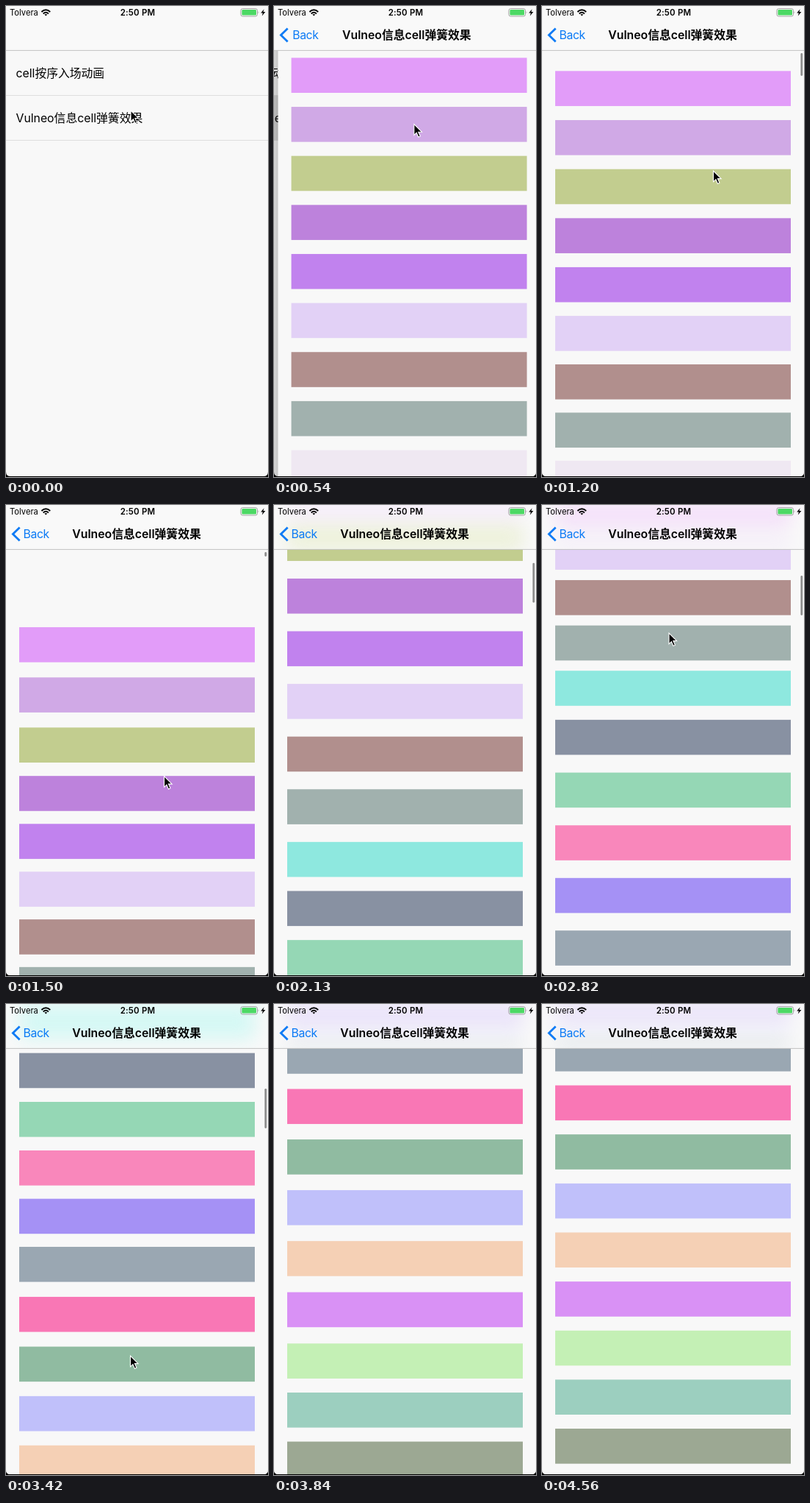
Recreate the animation shown at these times as an HTML page. Size 357 by 640 pixels, loop 4.62 s.

```html
<!DOCTYPE html>
<html lang="zh-CN">
<head>
<meta charset="utf-8">
<style>
html, body { margin: 0; width: 100%; height: 100%; overflow: hidden; background: #000; }
svg { display: block; width: 100vw; height: 100vh; }
text { font-family: Inter, "Noto Sans CJK SC", "Noto Sans CJK", sans-serif; font-size: 15.8px; }
</style>
</head>
<body>
<svg viewBox="0 0 357 640">
  <defs>
    <clipPath id="screen"><path d="M0 0H357V633Q357 639 351 639H6Q0 639 0 633Z"/></clipPath>
    <clipPath id="navClip"><rect width="357" height="60.5"/></clipPath>
    <filter id="frost" filterUnits="userSpaceOnUse" x="-40" y="-80" width="440" height="200" color-interpolation-filters="sRGB">
      <feGaussianBlur stdDeviation="13"/>
      <feColorMatrix type="saturate" values="1.8"/>
    </filter>
    <linearGradient id="shade"><stop offset="0" stop-opacity="0"/><stop offset="1" stop-opacity=".12"/></linearGradient>
  </defs>
  <rect width="357" height="640"/>
  <g clip-path="url(#screen)">
    <rect width="357" height="640" fill="#f8f8f8"/>
    <g id="list">
      <rect id="pressed" y="122" width="357" height="61" fill="#d9d9d9"/>
      <path d="M0 121.5H357M0 182.5H357" stroke="#dedede"/>
      <text x="13.5" y="96.5">cell按序入场动画</text>
      <text x="13.5" y="158">Vulneo信息cell弹簧效果</text>
    </g>
    <rect id="dim" width="357" height="640" opacity="0"/>
    <g id="page">
      <rect x="-9" width="9" height="640" fill="url(#shade)"/>
      <rect width="357" height="640" fill="#f8f8f8"/>
      <g id="bars"></g>
      <rect id="thumb" x="352.4" width="2.8" rx="1.4" fill="#8c8c8c"/>
    </g>
    <rect width="357" height="60.5" fill="#f9f9f9"/>
    <g clip-path="url(#navClip)" opacity=".22">
      <g filter="url(#frost)"><g clip-path="url(#navClip)"><use href="#bars"/></g></g>
    </g>
    <path d="M0 60.4H357" stroke="#bcbcbc" stroke-width=".9"/>
    <g id="back" fill="#0a7af5">
      <path d="M18.6 30.6L9.4 39.6L18.6 48.6" fill="none" stroke="#0a7af5" stroke-width="2.8"/>
      <text id="backText" x="23.5" y="45.4" letter-spacing="-.4">Back</text>
    </g>
    <text id="title" x="178" y="45.4" text-anchor="middle" font-weight="600">Vulneo信息cell弹簧效果</text>
    <text x="5" y="13" style="font-size:11.2px">Tolvera</text>
    <text x="179.5" y="13" text-anchor="middle" font-weight="600" style="font-size:11.4px" letter-spacing=".25">2:50 PM</text>
    <g fill="none" stroke="#000" stroke-width="2">
      <path d="M48.4 8.1Q54.3 2.5 60.2 8.1M50.7 10.4Q54.3 7.2 57.9 10.4"/>
      <path d="M54.3 13.6L52.4 11.6Q54.3 10.2 56.2 11.6Z" fill="#000" stroke="none"/>
    </g>
    <rect x="319.9" y="3.6" width="22.6" height="10.4" rx="2.6" fill="none" stroke="#999" stroke-width=".9"/>
    <rect x="321.4" y="5.1" width="19.6" height="7.4" rx="1.3" fill="#4cd964"/>
    <path d="M343.6 7Q345.2 8.8 343.6 10.6Z" fill="#999"/>
    <path d="M351.6 4.2L347.2 9.6H349.9L348.8 13.6L353.4 8H350.5Z"/>
    <path id="cursor" d="M0 0V14.8L3.4 11.6L5.9 17.4L8.4 16.3L5.9 10.6H10.6Z" stroke="#fff" stroke-width="1.1"/>
  </g>
</svg>
<script>
const LOOP = 4620, STEP = 30;
const PITCH = 66.64, TOP = 70.4;
const ROW_DELAY = 7, MAX_ROWS = 6;   // the spring: rows trail the touched row
const $ = id => document.getElementById(id);

const colors = ('e29cf9 d0a9e6 c2cd8f bd82dc c182ee e2d1f6 b18f8d a1b1ae 8ee8df 8891a2 95d7b5 ' +
  'f987bb a591f5 9aa7b2 f977b5 90bba1 c0c0fa f5d0b5 d991f5 c4f0b5 9ccfbf 9ca893').split(' ');

const moves = [
  { at: 1080, dur: 110, by: -18, row: 2 },      // nudge
  { at: 1210, dur: 340, by: -86, row: 2.2 },    // pull down
  { at: 1550, dur: 300, by: 104, row: 2.2 },    // bounce back
  { at: 1777, dur: 630, by: 297, row: 2 },      // flicks
  { at: 2628, dur: 558, by: 306.5, row: 8.5 },
  { at: 3390, dur: 480, by: 289.3, row: 13 }
];

// Pointer stops: time, x, y
const stops = [[200, 170, 142], [1100, 235, 200], [1200, 233.5, 224], [1500, 215.5, 368.5],
  [1900, 200, 400], [2120, 196, -30], [2400, 176, -30], [2600, 175, 260], [2820, 173, 174],
  [3420, 169.5, 478], [3720, 175, -30]];

const clamp = (v, a = 0, b = 1) => Math.min(b, Math.max(a, v));
const ramp = (t, a, b) => clamp((t - a) / (b - a));
const smooth = u => u * u * (3 - 2 * u);
const mix = (a, b, u) => a + (b - a) * u;
const set = (el, attrs) => { for (const k in attrs) el.setAttribute(k, attrs[k]); };

// Scroll offset of one row, or of the page itself when no row is given
function offsetAt(t, row) {
  return moves.reduce((sum, m) => {
    const rows = row === undefined ? 0 : Math.min(MAX_ROWS, Math.abs(row - m.row));
    const start = m.at + ROW_DELAY * rows;
    return sum + m.by * smooth(ramp(t, start, start + m.dur));
  }, 0);
}

const bars = colors.map(c => {
  const bar = document.createElementNS('http://www.w3.org/2000/svg', 'rect');
  set(bar, { x: 18, width: 321, height: 47.6, fill: '#' + c });
  $('bars').append(bar);
  return bar;
});

function drawPush(t) {
  const p = 1 - (1 - ramp(t, 180, 660)) ** 3;
  set($('pressed'), { opacity: t >= 90 ? 1 : 0 });
  set($('list'), { transform: `translate(${-107 * p})` });
  set($('dim'), { opacity: .1 * p });
  set($('page'), { transform: `translate(${357 * (1 - p)})`, opacity: p > 0 ? 1 : 0 });
  set($('title'), { x: 178 + 180 * (1 - p), opacity: p });
  set($('back'), { opacity: p });
  set($('backText'), { x: 23.5 + 110 * (1 - p) });
}

function drawScroll(t) {
  bars.forEach((bar, i) => {
    const y = TOP + PITCH * i - offsetAt(t, i);
    set(bar, { y: y.toFixed(2), visibility: y > -110 && y < 640 ? 'visible' : 'hidden' });
  });
  // this cell gets a new colour when it is reused
  set(bars[8], { fill: t < 1600 ? '#efe8f2' : '#' + colors[8] });
  const offset = offsetAt(t);
  set($('thumb'), {
    y: 64 + .084 * Math.max(0, offset),
    height: clamp(54 + 1.28 * offset, 6, 54),
    opacity: ramp(t, 1080, 1140) * (1 - ramp(t, 3660, 3800))
  });
}

function drawCursor(t) {
  const next = stops.findIndex(s => s[0] > t);
  const b = stops.at(next), a = next > 0 ? stops[next - 1] : b;
  const u = a === b ? 1 : smooth(ramp(t, a[0], b[0]));
  set($('cursor'), { transform: `translate(${mix(a[1], b[1], u)} ${mix(a[2], b[2], u)})` });
}

function draw(t) {
  drawPush(t);
  drawScroll(t);
  drawCursor(t);
}

const start = performance.now();
function tick() {
  const t = (performance.now() - start) % LOOP;
  draw(Math.min(Math.floor(t / STEP) * STEP, LOOP - 2 * STEP));
  requestAnimationFrame(tick);
}
tick();
</script>
</body>
</html>
```
